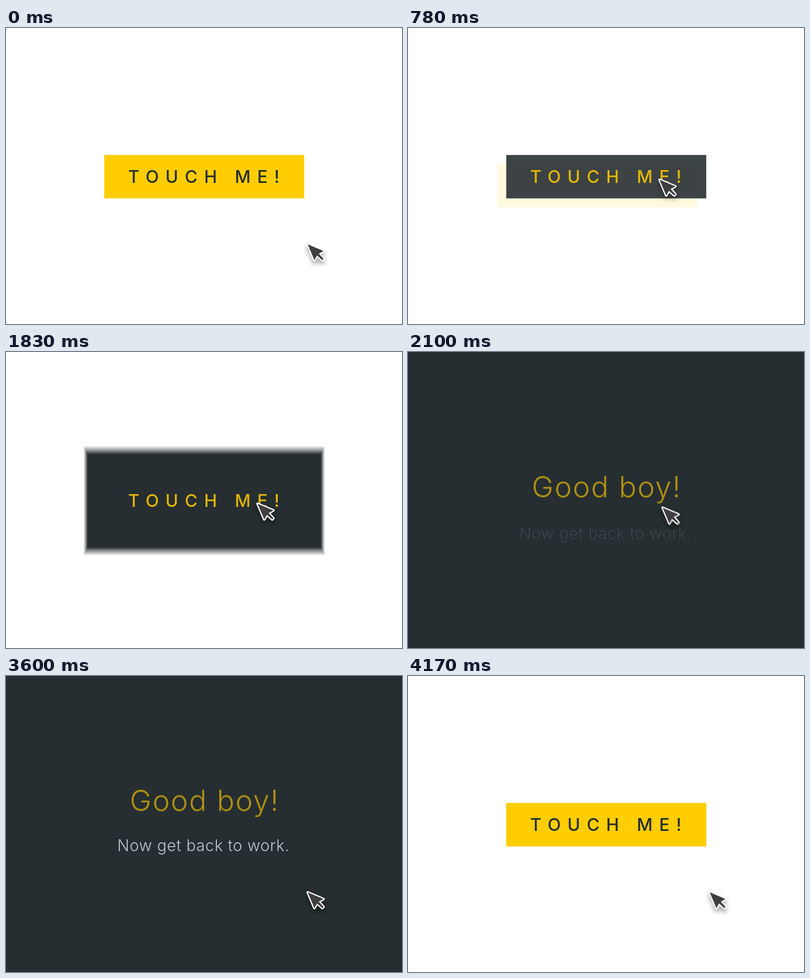
These frames come from a looping animation (800x600 px, 4.2 s). An HTML page with a canvas:

```html
<!DOCTYPE html>
<html lang="en">
<head>
<meta charset="utf-8">
<title>Touch me</title>
<style>
  html, body { margin: 0; width: 100%; height: 100%; overflow: hidden; background: #fff; }
  canvas { display: block; }
</style>
</head>
<body>
<canvas id="stage" width="800" height="600"></canvas>
<script>
const LOOP = 4200, STEP = 30, SHUTTER = 15, SAMPLES = 8;
const YELLOW = [255, 205, 0], DARK = [38, 46, 49], PALE = [190, 196, 208];
const CENTER = { x: 400.5, y: 301.4 };
const ARROW = [[0, 0], [32, 13.5], [22.5, 19], [32, 29.5], [29.5, 32], [19, 22.5], [13.5, 32]];

const stage = document.getElementById('stage').getContext('2d');
const layer = document.createElement('canvas');
layer.width = 800;
layer.height = 600;
const ctx = layer.getContext('2d');

const ramp = (t, a, b) => Math.min(1, Math.max(0, (t - a) / (b - a)));
const easeOut = (x, n = 3) => 1 - (1 - x) ** n;
const inOut = x => x < 0.5 ? 4 * x ** 3 : 1 - 4 * (1 - x) ** 3;
const smooth = x => x * x * (3 - 2 * x);
const mix = (a, b, p) => a + (b - a) * p;
const blend = (a, b, p) => a.map((v, i) => mix(v, b[i], p));
const rgba = (c, alpha = 1) => `rgba(${c.map(Math.round)},${alpha})`;

function box(halfW, halfH, shift, color, alpha) {
  if (alpha <= 0) return;
  ctx.fillStyle = rgba(color, alpha);
  ctx.fillRect(CENTER.x + shift - halfW, CENTER.y - shift - halfH, 2 * halfW, 2 * halfH);
}

function label(text, x, y, font, spacing, color, alpha) {
  if (alpha <= 0) return;
  ctx.font = font + ' Inter, Lato, sans-serif';
  ctx.letterSpacing = spacing + 'px';
  ctx.fillStyle = rgba(color, alpha);
  ctx.fillText(text, x, y);
}

function button(t) {
  const hover = easeOut(ramp(t, 515, 1025));
  const slide = 18 * easeOut(ramp(t, 515, 880), 5);
  const back = inOut(ramp(t, 3800, 4180));
  let w = 202, h = 44;
  if (t < 3700) {
    w = mix(202, 430, inOut(ramp(t, 1622, 2206)));
    h = mix(44, 320, inOut(ramp(t, 1673, 2074)));
    box(202, 44, -slide, YELLOW, 1 - hover);
  } else {
    w = mix(401, 202, back);
    h = mix(302, 44, back);
  }
  box(w, h, 18 - slide, blend(DARK, YELLOW, back), hover);

  const late = t > 3700;
  const ink = late ? DARK : blend(DARK, YELLOW, hover);
  const alpha = late ? ramp(t, 3880, 4120) : 1 - ramp(t, 1790, 2040);
  label('TOUCH ME!', 246.8, 313.8, '500 35px', 13.3, ink, alpha);
}

function ripple(t) {
  const p = ramp(t, 1215, 1620);
  if (p <= 0 || p >= 1) return;
  ctx.fillStyle = rgba(YELLOW, 0.35 * (1 - p));
  ctx.beginPath();
  ctx.arc(507.5, 308, 80 * easeOut(p), 0, 2 * Math.PI);
  ctx.fill();
}

// Rises in, rests, then leaves upwards; the exit cuts in already under way.
function message(t, delay, text, x, y, font, spacing, color) {
  const enter = easeOut(ramp(t, 1945 + delay, 2445 + delay));
  const leave = t < 3580 ? 0 : easeOut(ramp(t, 3512 + delay, 4126 + delay));
  label(text, x, y + 30 * (1 - enter - leave), font, spacing, color, enter * (1 - leave));
}

function cursor(t) {
  const p = smooth(ramp(t, 255, 755)) - smooth(ramp(t, 2010, 2560));
  ctx.save();
  ctx.translate(609.5 - 101.3 * p, 438.5 - 131 * p);
  ctx.beginPath();
  ARROW.forEach(([x, y]) => ctx.lineTo(x, y));
  ctx.closePath();
  ctx.lineJoin = 'round';
  ctx.lineWidth = 5;
  ctx.strokeStyle = '#fff';
  ctx.save();
  ctx.shadowColor = 'rgba(0,0,0,0.4)';
  ctx.shadowBlur = 10;
  ctx.shadowOffsetY = 6;
  ctx.stroke();
  ctx.restore();
  ctx.fillStyle = '#403e3e';
  ctx.fill();
  ctx.restore();
}

function scene(t) {
  ctx.fillStyle = '#fff';
  ctx.fillRect(0, 0, 800, 600);
  button(t);
  ripple(t);
  message(t, 0, 'Good boy!', 250, 284, '300 59px', 2, YELLOW);
  message(t, 117, 'Now get back to work.', 224.8, 354.5, '300 32px', 0.65, PALE);
  cursor(t);
}

const moving = t => (t >= 270 && t <= 1020) || (t >= 1230 && t <= 2580) || t >= 3600;

// Motion blur: the running average of several moments within the shutter time.
function draw(t) {
  const count = moving(t) ? SAMPLES : 1;
  for (let i = 0; i < count; i++) {
    scene(t - SHUTTER * i / SAMPLES);
    stage.globalAlpha = 1 / (i + 1);
    stage.drawImage(layer, 0, 0);
  }
}

const start = performance.now();
let shown = -1;
function tick() {
  const t = Math.floor((performance.now() - start) % LOOP / STEP) * STEP;
  if (t !== shown) draw(shown = t);
  requestAnimationFrame(tick);
}
tick();
</script>
</body>
</html>
```
